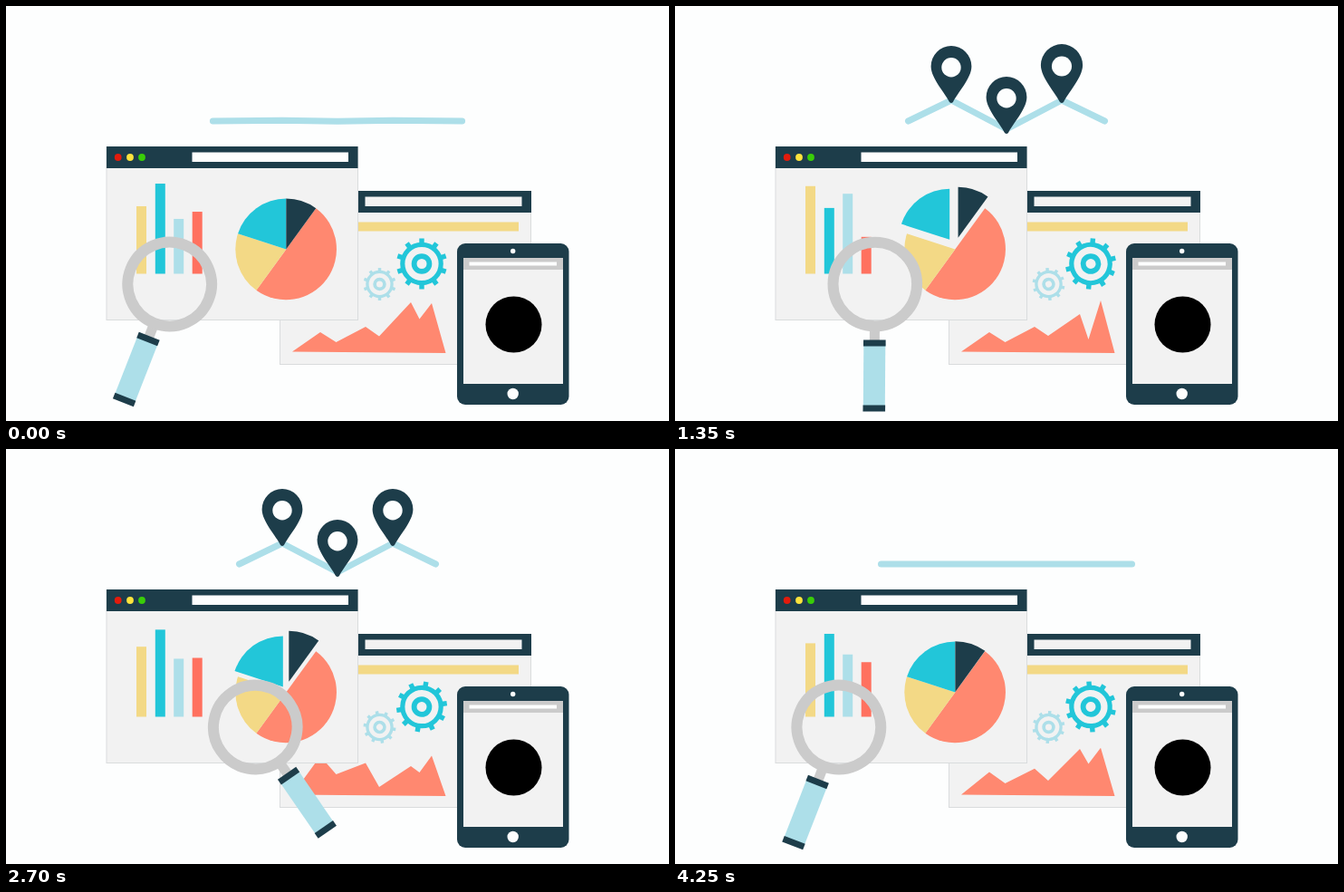
Write an HTML page that moves like this. It is 732x458 px and loops after 4.3 s.

```html
<!DOCTYPE html>
<html lang="en">
<head>
<meta charset="utf-8">
<title>Analytics</title>
<style>
  html, body { margin: 0; width: 100%; height: 100%; overflow: hidden; background: #fdfefe; }
  svg { display: block; width: 732px; height: 458px; }
  .dark { fill: #1d3d4a; }
  .body { fill: #f2f2f2; }
  .frame { fill: #f2f2f2; stroke: #d9dcdd; }
  .cyan { fill: #22c6d9; }
  .light { fill: #addfe9; }
  .yellow { fill: #f3d986; }
  .salmon { fill: #ff8870; }
  .red { fill: #ff715f; }
  .gray { fill: #cbcbcb; }
  .white { fill: #fdfefe; }
</style>
</head>
<body>
<svg viewBox="0 0 732 458">
  <defs>
    <g id="pin">
      <path class="dark" d="M-2-1C-6-10-22.4-27-22.4-40.5A22.4 22.4 0 0 1 22.4-40.5C22.4-27 6-10 2-1Q0 1-2-1Z"/>
      <circle class="white" cy="-39.3" r="10.7"/>
    </g>
  </defs>

  <polyline id="line" fill="none" stroke="#addfe9" stroke-width="7" stroke-linecap="round" stroke-linejoin="round"/>
  <g id="pins"></g>

  <rect class="frame" x="302.5" y="204.5" width="277" height="191"/>
  <rect class="dark" x="302" y="204" width="278" height="24"/>
  <rect class="body" x="396.500" y="210.500" width="173" height="10.500"/>
  <rect class="yellow" x="380" y="238.500" width="186" height="10"/>
  <g id="gears"></g>
  <polygon id="hills" class="salmon"/>

  <rect class="frame" x="111" y="155.500" width="277.500" height="191"/>
  <rect class="dark" x="111" y="155" width="277.500" height="24"/>
  <circle cx="123.700" cy="167" r="3.900" fill="#e31b0c"/>
  <circle cx="137" cy="167" r="3.900" fill="#fce33d"/>
  <circle cx="150" cy="167" r="3.900" fill="#39cd08"/>
  <rect class="white" x="205.500" y="161.500" width="172.500" height="10.500"/>
  <g id="bars"></g>
  <g id="pie"></g>

  <rect class="dark" x="498" y="262" width="123.500" height="178" rx="9"/>
  <rect class="body" x="505" y="278" width="110" height="139"/>
  <rect class="gray" x="505" y="278" width="110" height="13"/>
  <rect class="white" x="511.500" y="282.500" width="96.500" height="4"/>
  <circle class="white" cx="559.700" cy="270.500" r="2.700"/>
  <circle class="white" cx="559.700" cy="428" r="6.200"/>
  <circle cx="560.500" cy="351.500" r="31"/>

  <g id="lens">
    <rect class="gray" x="-5.500" y="50" width="11" height="13"/>
    <rect class="light" x="-12" y="66" width="24" height="69"/>
    <rect class="dark" x="-12.300" y="61.500" width="24.600" height="7"/>
    <rect class="dark" x="-12.300" y="133.500" width="24.600" height="7"/>
    <circle r="46.300" fill="none" stroke="#cbcbcb" stroke-width="12"/>
  </g>
</svg>
<script>
const LOOP = 4300, STEP = 50;
const $ = id => document.getElementById(id);

function add(parent, tag, attrs) {
  const el = document.createElementNS('http://www.w3.org/2000/svg', tag);
  for (const k in attrs) el.setAttribute(k, attrs[k]);
  return parent.appendChild(el);
}

// Easings on 0..1
const sine = p => (1 - Math.cos(Math.PI * p)) / 2;
const quad = p => p < .5 ? 2 * p * p : 1 - 2 * (1 - p) ** 2;
const cubic = p => p < .5 ? 4 * p ** 3 : 1 - 4 * (1 - p) ** 3;
const smooth = p => p * p * (3 - 2 * p);

const part = (t, a, b) => Math.min(1, Math.max(0, (t - a) / (b - a)));
const mix = (a, b, p) => a + (b - a) * p;

// keys: [time, value] pairs
function track(t, keys, ease) {
  let v = keys[0][1];
  for (let i = 1; i < keys.length; i++) {
    v = mix(v, keys[i][1], ease(part(t, keys[i - 1][0], keys[i][0])));
  }
  return v;
}

// Soft there-and-back swing, mids and rate in seconds
function swing(t, up, down, rate) {
  const s = m => 1 / (1 + Math.exp(-rate * (t / 1000 - m)));
  return s(up) - s(down) + 1 - s(down - LOOP / 1000);
}

const pins = [[305, 107, 500], [366, 141, 635], [427, 107, 740]].map(([x, y, start]) =>
  ({ x, y, start, el: add($('pins'), 'use', { href: '#pin' }) }));

const bars = [
  ['yellow', 144, 221, 197], ['cyan', 164.8, 196, 225],
  ['light', 185.2, 235, 205], ['red', 205.7, 227, 257]
].map(([cls, x, low, high]) =>
  ({ low, high, el: add($('bars'), 'rect', { class: cls, x, width: 11 }) }));

function slice(cls, from, to) {
  const at = deg => {
    const a = deg * Math.PI / 180;
    return (309.3 + 56 * Math.sin(a)).toFixed(2) + ' ' + (268.5 - 56 * Math.cos(a)).toFixed(2);
  };
  return add($('pie'), 'path', { class: cls, d: `M309.3 268.500L${at(from)}A56 56 0 0 1 ${at(to)}Z` });
}
slice('salmon', 36, 216);
slice('yellow', 216, 288);
const cyanSlice = slice('cyan', 288, 360);
const darkSlice = slice('dark', 0, 36);

function gear(x, y, size, color) {
  const g = add($('gears'), 'g', {});
  for (let i = 0; i < 10; i++) {
    add(g, 'rect', { x: -2.7, y: -28, width: 5.4, height: 6, fill: color, transform: `rotate(${i * 36})` });
  }
  for (const [r, w] of [[21.2, 5.2], [8.4, 5.8]]) {
    add(g, 'circle', { r, fill: 'none', stroke: color, 'stroke-width': w });
  }
  return deg => g.setAttribute('transform', `translate(${x} ${y}) scale(${size}) rotate(${deg})`);
}
const bigGear = gear(459, 284.5, 1, '#22c6d9');
const smallGear = gear(412.5, 307, .64, '#addfe9');

const hillX = [347, 364.5, 397, 412, 447, 456.5, 470];
const hillA = [360, 371, 354, 364.5, 327, 345.5, 328];
const hillB = [360, 371, 354, 364, 340, 368, 325];
const hillC = [339, 359, 346.5, 373, 350, 357, 338.5];

const move = (el, x, y) => el.setAttribute('transform', `translate(${x} ${y})`);

// Fast pop past full size, then settle
function pop(t) {
  if (t <= 0) return 0;
  return 1.14 * (1 - Math.exp(-t / 48)) - .14 * sine(part(t, 370, 720));
}

function draw(t) {
  // Connecting line, its rise beginning just before the loop point
  const rise = quad(part(t, -80, 580)) - quad(part(t, 3700, 4250));
  const peak = mix(127, 104, rise), end = 30 * rise;
  $('line').setAttribute('points',
    `${227.5 + end},127 305,${peak} 366,${mix(127, 136, rise)} 427,${peak} ${504.5 - end},127`);

  for (const p of pins) {
    const k = pop(Math.min(t, 4350 - t) - p.start);
    p.el.setAttribute('transform', `translate(${p.x} ${p.y}) scale(${k})`);
  }

  const level = track(t, [[-80, 0], [1000, 1], [2330, 0], [3530, 1], [4750, 0]], cubic);
  for (const b of bars) {
    const y = mix(b.low, b.high, level);
    b.el.setAttribute('y', y);
    b.el.setAttribute('height', 295.5 - y);
  }

  const d = track(t, [[900, 0], [1700, 22], [2500, 12], [3620, 12], [4320, 0]], smooth);
  const c = track(t, [[750, 0], [1650, 16.5], [2500, 7], [3620, 7], [4260, 0]], smooth);
  move(darkSlice, .25 * d, -.97 * d);
  move(cyanSlice, -.5 * c, -.87 * c);

  const ab = sine(part(t, 0, 1226)), bc = sine(part(t, 1700, 2650)), ca = sine(part(t, 3422, 4558));
  const tops = hillX.map((x, i) =>
    x + ',' + mix(mix(mix(hillA[i], hillB[i], ab), hillC[i], bc), hillA[i], ca));
  $('hills').setAttribute('points', `316,381.500 ${tops.join(' ')} 485.500,383`);

  bigGear(360 * t / LOOP);
  smallGear(-360 * t / LOOP);

  const x = 180.3 + 96 * swing(t, 1.4, 3.42, 6.3);
  const tilt = 21.8 - 57.6 * swing(t, 1.445, 3.385, 5.55);
  $('lens').setAttribute('transform', `translate(${x} 307) rotate(${tilt})`);
}

const begin = performance.now();
function tick() {
  const t = (performance.now() - begin) % LOOP;
  draw(Math.floor(t / STEP) * STEP);
  requestAnimationFrame(tick);
}
tick();
</script>
</body>
</html>
```
